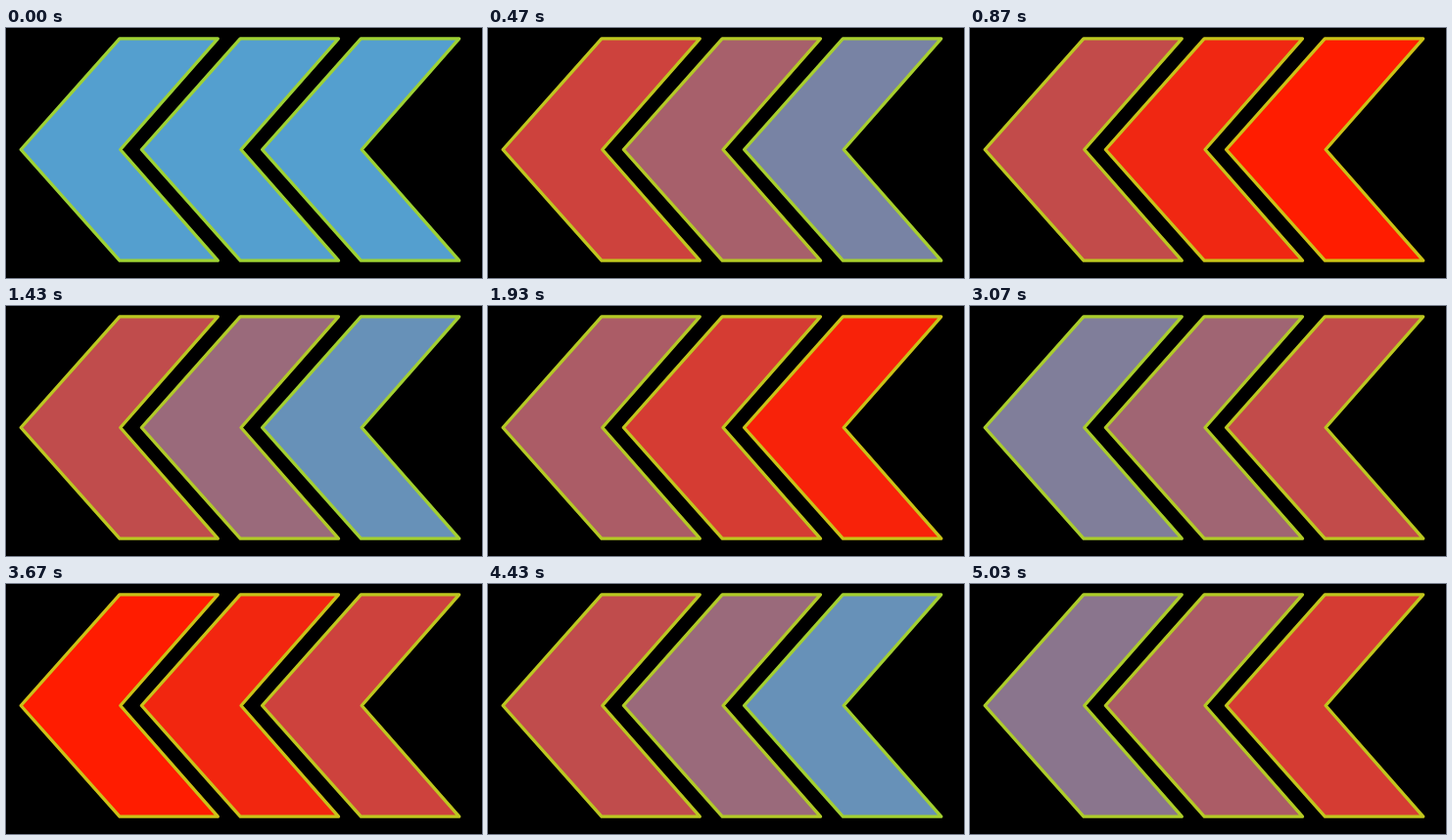
An HTML page that plays this animation: 486 by 256 pixels, repeating every 5060 ms.

```html
<!DOCTYPE html>
<html lang="en">
<head>
<meta charset="utf-8">
<title>Arrows</title>
<style>
html, body { margin: 0; width: 100%; height: 100%; overflow: hidden; background: #000; }
svg { display: block; width: 486px; height: 256px; }
path { stroke-width: 3.3; stroke-linejoin: round; }
</style>
</head>
<body>
<svg viewBox="0 0 486 256"></svg>
<script>
const LOOP = 5060, PERIOD = 1000, STEP = 1000 / 30;
const FILL = [[84, 159, 207], [255, 28, 0]];
const LINE = [[158, 210, 52], [204, 194, 22]];
// Share of red over one pulse
const PULSE = [[0, 0], [.03, .1], [.13, .4], [.25, .67], [.4, 1], [.5, 1],
  [.6, .87], [.67, .63], [1, 0]];

const svg = document.querySelector('svg');
const arrows = [0, 1, 2].map(i => {
  const path = document.createElementNS('http://www.w3.org/2000/svg', 'path');
  path.setAttribute('d', 'M116 10.8H216.3L116.8 124.5L216.3 238.2H116L15.2 124.5Z');
  path.setAttribute('transform', `translate(${i * 123.2} 0)`);
  svg.append(path);
  return { path, delay: 200 + i * 100 };
});

function pulse(p) {
  const i = PULSE.findIndex(([x]) => x > p);
  const [x0, y0] = PULSE[i - 1], [x1, y1] = PULSE[i];
  return y0 + (y1 - y0) * (p - x0) / (x1 - x0);
}

function mix([a, b], k) {
  return `rgb(${a.map((v, i) => Math.round(v + (b[i] - v) * k)).join(',')})`;
}

function draw(time) {
  const tick = Math.floor(time / 10) * 10 + 5;
  const t = Math.floor(tick / STEP) * STEP;
  for (const { path, delay } of arrows) {
    const k = t < delay ? 0 : pulse((t - delay) % PERIOD / PERIOD);
    path.setAttribute('fill', mix(FILL, k));
    path.setAttribute('stroke', mix(LINE, k));
  }
}

const start = performance.now();
function loop() {
  draw((performance.now() - start) % LOOP);
  requestAnimationFrame(loop);
}
loop();
</script>
</body>
</html>
```
